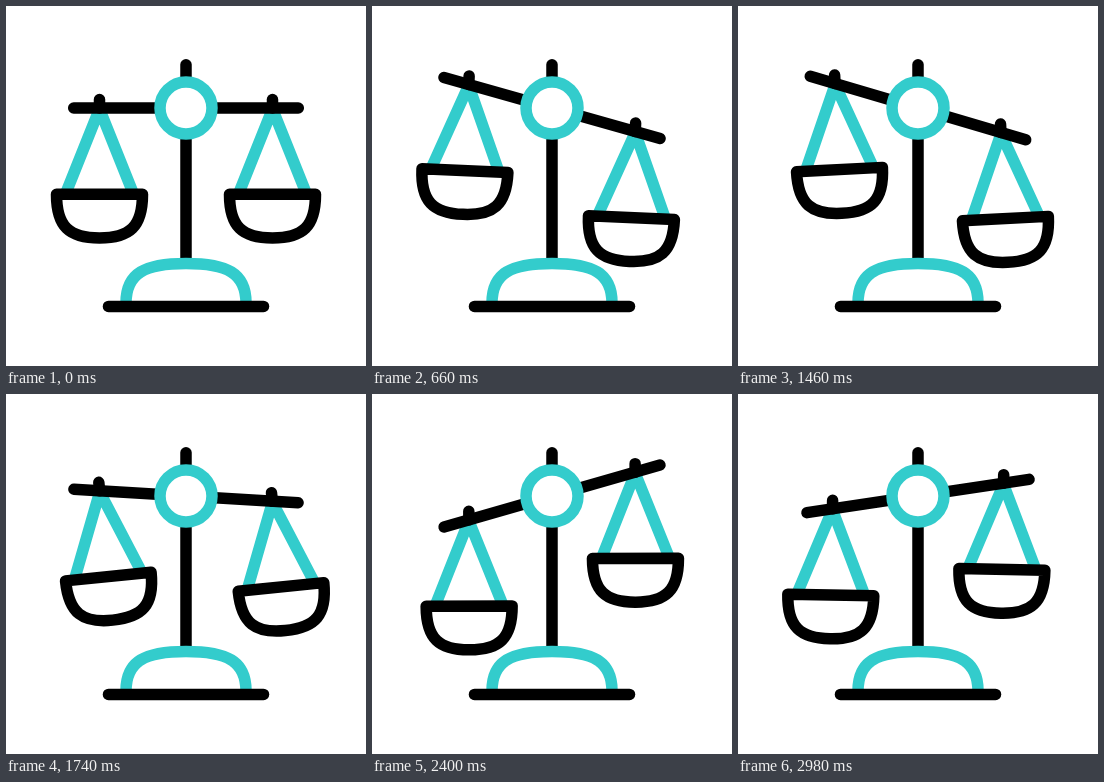
Write an HTML page that moves like this. It is 360 px wide and 360 px high and loops after 3 s.

```html
<!DOCTYPE html>
<html lang="en">
<head>
<meta charset="utf-8">
<title>Balance scales</title>
<style>
  @property --tilt { syntax: "<angle>"; inherits: true; initial-value: 0deg; }
  @property --swing { syntax: "<angle>"; inherits: true; initial-value: 0deg; }

  html, body { margin: 0; width: 100%; height: 100%; overflow: hidden; background: #fff; }
  svg {
    display: block;
    width: 100%;
    height: 100%;
    fill: none;
    stroke: #000;
    stroke-width: 11.5;
    stroke-linecap: round;
    stroke-linejoin: round;
    animation: tilt 3s infinite, swing 3s infinite;
  }
  .teal { stroke: #3cc; }
  .flat { stroke-linecap: butt; }
  .beam { transform-origin: 180px 102px; transform: rotate(var(--tilt)); }
  /* pans hang from the beam, so they undo its tilt and add their own swing */
  .pan { transform: rotate(calc(var(--swing) - var(--tilt))); }

  @keyframes tilt {
    0% { --tilt: 0deg; animation-timing-function: cubic-bezier(.36, 0, .5, 1); }
    38.33% { --tilt: 22.3deg; animation-timing-function: cubic-bezier(.37, 0, .57, 1); }
    80% { --tilt: -16deg; animation-timing-function: cubic-bezier(.403, 0, .683, .497); }
    100% { --tilt: -8.14deg; }
  }
  @keyframes swing {
    0% { --swing: 0deg; animation-timing-function: cubic-bezier(.36, 0, .64, 1); }
    18% { --swing: 2.8deg; animation-timing-function: cubic-bezier(.36, 0, .64, 1); }
    36.67% { --swing: .4deg; animation-timing-function: cubic-bezier(.33, 0, .6, 1); }
    61.33% { --swing: -6deg; animation-timing-function: cubic-bezier(.36, 0, .64, .95); }
    80% { --swing: -.2deg; animation-timing-function: cubic-bezier(.3, .3, .6, 1); }
    100% { --swing: 1.1deg; }
  }
</style>
</head>
<body>
<svg viewBox="0 0 360 360">
  <defs>
    <g id="pan">
      <path class="teal" d="M-33.2 84L0 1L33.2 84"/>
      <path d="M0 0V-8.5"/>
      <path d="M-43 86.2H43C43 119 30 130 0 130S-43 119-43 86.2Z"/>
    </g>
  </defs>

  <path d="M180 58.8V256"/>
  <path class="teal flat" d="M120 297C120 267 139 257.5 180 257.5S240 267 240 297"/>
  <path d="M102.5 300.4H257.5"/>

  <g class="beam">
    <g transform="translate(93.5 102)"><g class="pan"><use href="#pan"/></g></g>
    <g transform="translate(266.5 102)"><g class="pan"><use href="#pan"/></g></g>
    <path d="M67.7 102H292.3"/>
  </g>
  <circle class="teal" cx="180" cy="102" r="26" fill="#fff"/>
</svg>
</body>
</html>
```
